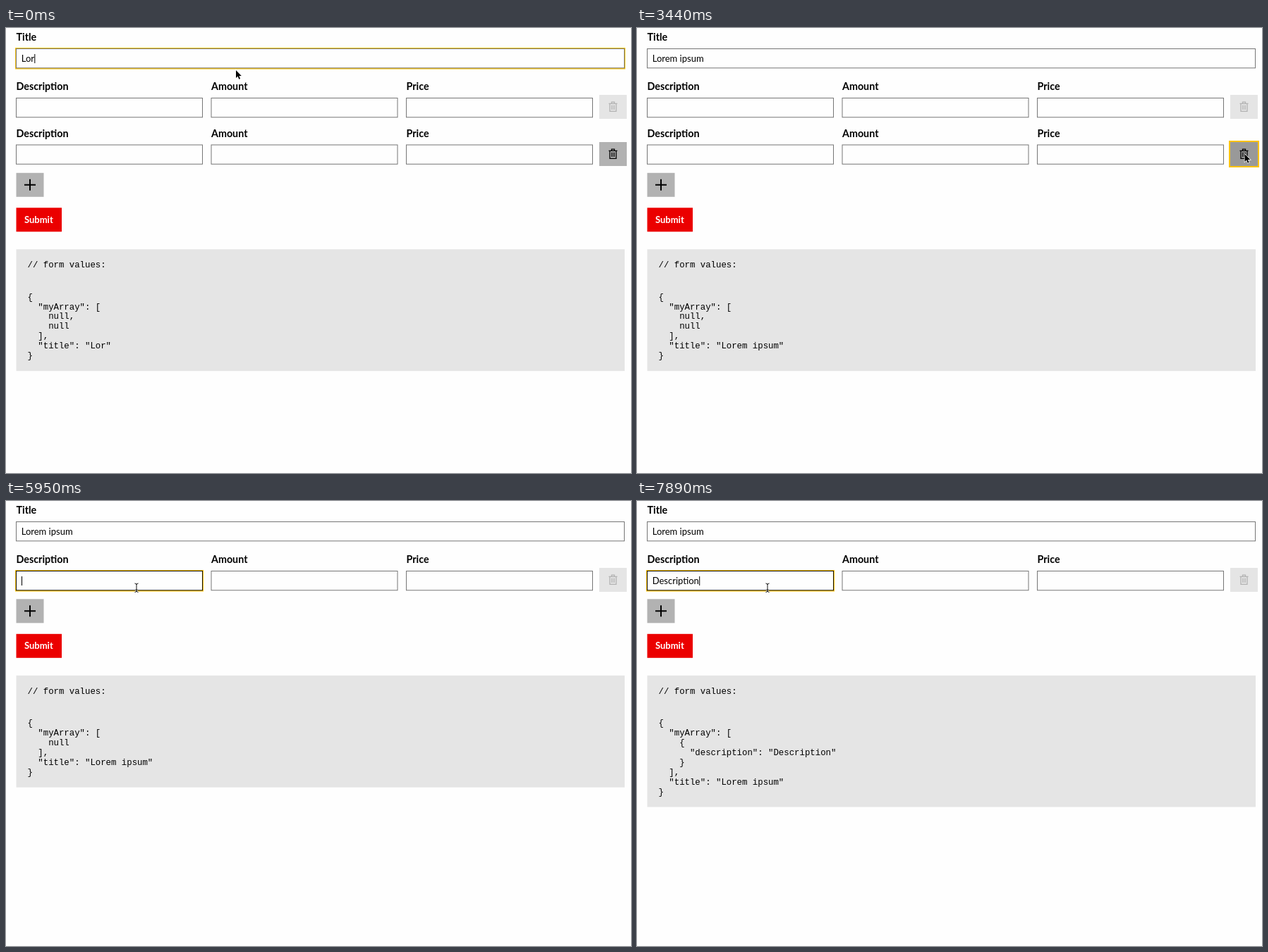
These frames come from a looping animation (886 px wide and 632 px high, 8 s). An HTML page:

```html
<!DOCTYPE html>
<html lang="en">
<head>
<meta charset="utf-8">
<title>Form array</title>
<style>
html, body { margin: 0; width: 100%; height: 100%; overflow: hidden; background: #fefefe; }
svg { display: block; width: 886px; height: 632px; }
text { white-space: pre; font: 13px Lato, sans-serif; }
.label { font-size: 14.3px; font-weight: 700; }
.submit { font-weight: 700; fill: #fff; }
.code { font: 12.35px "Liberation Mono", monospace; }
.option { font: 600 10.2px Inter, sans-serif; fill: #e8eaed; }
</style>
</head>
<body>
<svg id="stage" viewBox="0 0 886 632"></svg>
<script>
const LOOP = 8000, YELLOW = '#fac30f', ROW = 66.5;
const stage = document.getElementById('stage');
const pen = document.createElement('canvas').getContext('2d');

// [start time, typed letters]
const titleKeys = [[0, 3], [300, 4], [460, 5], [620, 6], [920, 7], [1060, 8], [1360, 9], [1510, 10], [1810, 11]];
const descKeys = [[0, 0], [6400, 1], [6550, 2]];
for (let k = 0; k < 8; k++) descKeys.push([6850 + k * 148.5, 3 + k + (k > 3)]);

// [start time, x, y]
const pointerPath = [
  [0, 326, 60], [2110, 425, 104], [2260, 645.5, 218], [2410, 790, 213], [2550, 846, 192],
  [2700, 860, 181], [2840, 861.5, 179], [4030, 861, 172], [4180, 861, 156], [4320, 860, 132],
  [4470, 858, 113], [4620, 854, 125], [4760, 690, 146], [4910, 512, 156], [5210, 390, 148],
  [5360, 245, 132], [5510, 185, 123]
];
const options = ['sdf', 'sdfsdf', 'kmkm', 'sdfdsf', 'sdfsf', 'ddd'];

const at = (keys, t) => keys.findLast(k => k[0] <= t);
const rect = (x, y, w, h, fill, extra = '') =>
  `<rect x="${x}" y="${y}" width="${w}" height="${h}" fill="${fill}" ${extra}/>`;
const text = (x, y, s, kind = '') => `<text x="${x}" y="${y}" class="${kind}">${s}</text>`;
const line = (d, color, width) => `<path d="${d}" fill="none" stroke="${color}" stroke-width="${width}"/>`;

function field(x, y, w, { value = '', focus, hover, caret } = {}) {
  pen.font = '13px Lato, sans-serif';
  const end = x + 8 + pen.measureText(value).width;
  return (focus ? rect(x - 1.5, y - 1.5, w + 3, 30.5, YELLOW) : '') +
    rect(x, y, w, 27.3, '#fefefe', `stroke="${hover ? '#111' : '#767676'}"`) +
    text(x + 7.2, y + 18, value) +
    (caret ? rect(end - .5, y + 7.5, 1, 13, '#000') : '');
}

function trash(y, fill, ink, focus) {
  return (focus ? rect(839, y - 2, 43, 38, YELLOW) : '') + rect(841, y, 39, 34, fill) +
    `<g transform="translate(860.5 ${y + 17})">` +
    line('M-6-4.7H6M-2-5V-6.8H2V-5M-4.5-4V6.3H4.5V-4', ink, 1.3) +
    line('M-2-2.5V4M0-2.5V4M2-2.5V4', ink, 1) + '</g>';
}

function row(y, desc, button) {
  return ['Description', 'Amount', 'Price'].map((name, i) => {
    const x = 14.5 + i * 276.5;
    return text(x, y + 5, name, 'label') + field(x, y + 16.5, 264, i ? {} : desc);
  }).join('') + button;
}

function panel(y, values) {
  const lines = JSON.stringify(values, null, 2).split('\n');
  return rect(14.5, y, 862.5, 75.3 + lines.length * 13.93, '#e5e5e5') +
    text(30.5, y + 26, '// form values:', 'code') +
    lines.map((s, i) => text(30.5, y + 71.3 + i * 13.93, s, 'code')).join('');
}

function menu() {
  return rect(14.5, 127.5, 264.5, 179.5, '#292a2d', 'rx="3" style="filter:drop-shadow(0 1px 1px #0006)"') +
    options.map((s, i) => text(24, 151.7 + i * 27.85, s, 'option')).join('');
}

function pointer([, x, y], beam) {
  const d = beam
    ? 'M-2.5-6Q0-6 0-4Q0-6 2.5-6M0-4V5M-2.5 6.5Q0 6.5 0 4.5Q0 6.5 2.5 6.5M-1.5 3H1.5'
    : 'M0 0V11L2.6 8.6L4.3 12.7L6.1 12L4.4 8H7.8Z';
  return `<g transform="translate(${x} ${y})">` + (beam
    ? line(d, '#fff', 2.4) + line(d, '#111', 1)
    : `<path d="${d}" stroke="#fff" stroke-width="1.4" paint-order="stroke"/>`) + '</g>';
}

function scene(t) {
  const title = 'Lorem ipsum'.slice(0, at(titleKeys, t)[1]);
  const description = 'Description'.slice(0, at(descKeys, t)[1]);
  const two = t < 3580, typing = t >= 5950, overField = t >= 5510;
  const shift = two ? ROW : 0;
  const first = { value: description, focus: typing, hover: overField, caret: typing };
  const values = { myArray: two ? [null, null] : [description ? { description } : null], title };
  return rect(0, 0, 886, 632, '#fefefe') +
    text(14.5, 18, 'Title', 'label') +
    field(14.5, 29.5, 862, { value: title, focus: t < 3290, caret: t < 2110 }) +
    row(83, first, trash(95, '#e5e5e5', '#b3b3b3')) +
    (two ? row(83 + ROW, {}, trash(162, t < 2700 ? '#b2b2b2' : '#999', '#000', t >= 3290)) : '') +
    rect(14.5, 139.3 + shift, 39, 34, '#b2b2b2') +
    line(`M26 ${156.3 + shift}h16m-8-8v16`, '#000', 2) +
    rect(14.5, 188.8 + shift, 64.5, 34, '#eb0000') +
    text(26, 210 + shift, 'Submit', 'submit') +
    panel(247.8 + shift, values) +
    (t >= 6100 && t < 6400 ? menu() : '') +
    pointer(at(pointerPath, t), overField);
}

let shown;
function tick() {
  const markup = scene(performance.now() % LOOP);
  if (markup !== shown) stage.innerHTML = shown = markup;
  requestAnimationFrame(tick);
}
tick();
</script>
</body>
</html>
```
